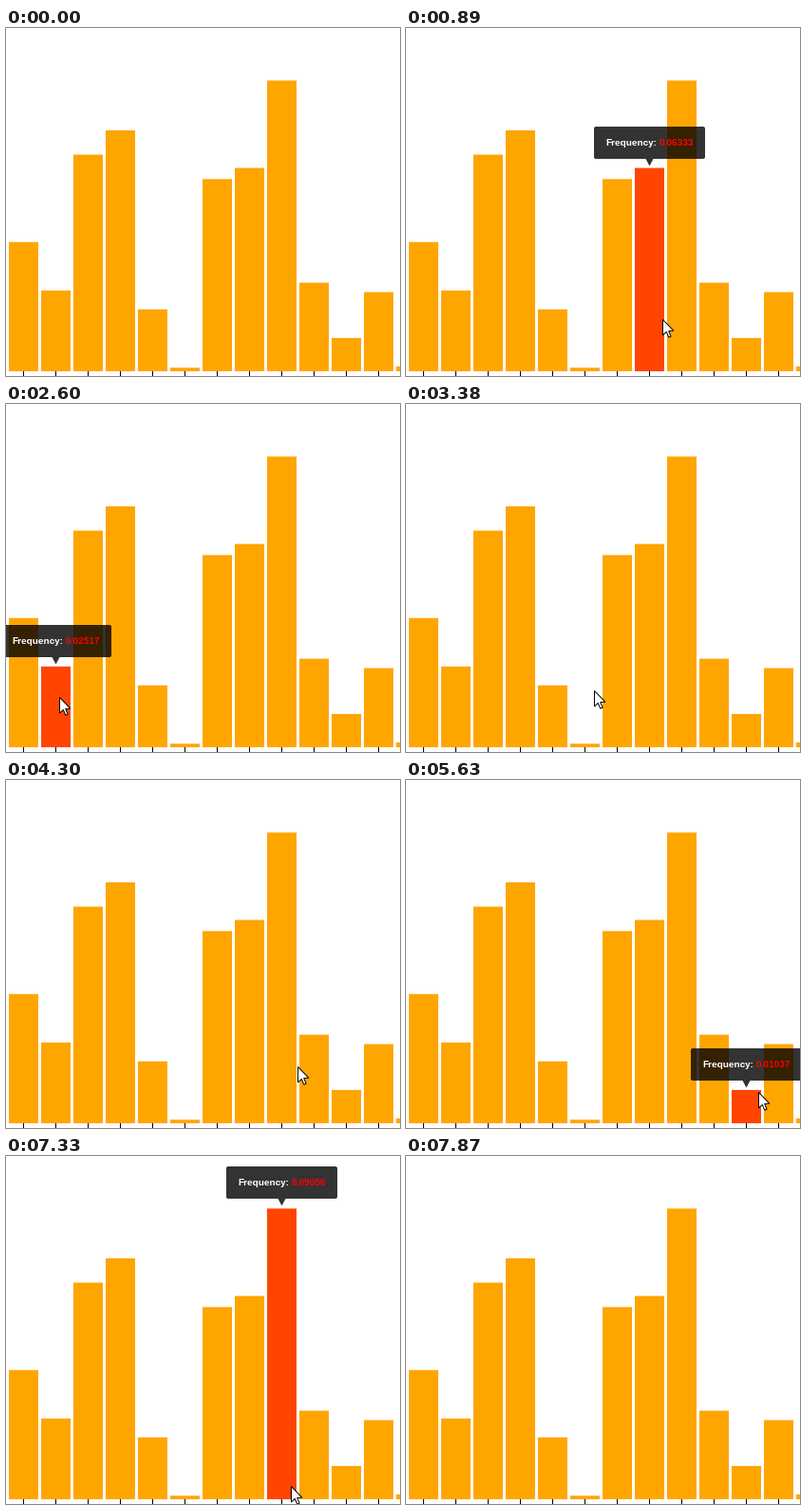
Animation, 415 px wide and 367 px high, one loop 8.48 s. Source, as a matplotlib script:

```python
import matplotlib.pyplot as plt
from matplotlib.animation import FuncAnimation
from matplotlib.patches import FancyBboxPatch, Polygon

plt.rcParams["text.hinting"] = "native"

W, H, DPI = 415, 367, 64
PX = 72 / DPI                      # points per pixel
LOOP, STEP, TICK = 8480, 10, 77    # ms

# English letter frequencies, L to X
FREQ = [.04025, .02517, .06749, .07507, .01929, .00110, .05987,
        .06333, .09056, .02758, .01037, .02465, .00150]
BASE, LEFT, PITCH, BAR_W = 362, 3, 34, 31
SCALE = 430 / .12702
TIP_W, TIP_H, PAD = 117, 34, 12

# pointer legs: start, end, destination
OFF = (318, 400)
LEGS = [
    (200, 430, (316, 324)),
    (740, 890, (270, 307)),
    (1670, 1900, (113, 307)),
    (2450, 2680, (54, 309)),
    (3020, 3380, (198, 302)),
    (3460, 3690, (252, 303)),
    (4070, 4300, (307, 302)),
    (4380, 4530, (347, 328)),
    (4700, 4700, (350, 328)),
    (5630, 5940, (381, 330)),
    (6870, 6870, (382, 330)),
    (6950, 7410, (300, 348)),
    (7720, 7800, (321, 360)),
    (7870, 7870, OFF),
]
ARROW = [(.5, .5), (.5, 17), (4.3, 13.4), (6.8, 19.2),
         (9.1, 18.2), (6.7, 12.5), (11.8, 12.2)]


def bar_left(i):
    return LEFT + PITCH * i


def bar_top(i):
    return BASE - FREQ[i] * SCALE


def ease_out(u):
    return 1 - (1 - u) ** 5


def pointer_at(ms):
    """Eased position, sampled once per tick of the screen recording."""
    x, y = OFF
    for start, end, (tx, ty) in LEGS:
        if ms < start:
            break
        ticks = round((end - start) / TICK)
        done = min(1, (ms - start) / max(1, end - start))
        e = ease_out((1 + int(done * ticks + 1e-6)) / (ticks + 1))
        x, y = round(x + (tx - x) * e), round(y + (ty - y) * e)
        if ms >= end:
            x, y = tx, ty
    return x, y


def hovered(x, y):
    i, dx = divmod(x - LEFT, PITCH)
    if 0 <= i < len(FREQ) and dx < BAR_W and bar_top(i) <= y < BASE:
        return i
    return None


def shifted(points, dx, dy):
    return [(x + dx, y + dy) for x, y in points]


fig = plt.figure(figsize=(W / DPI, H / DPI), dpi=DPI, facecolor="white")
ax = fig.add_axes([0, 0, 1, 1])
ax.axis("off")

lefts = [bar_left(i) for i in range(len(FREQ))]
flat = dict(align="edge", linewidth=0, snap=False)
bars = ax.bar(lefts, [-f * SCALE for f in FREQ], BAR_W, bottom=BASE,
              color="orange", **flat)
ax.bar([x + 15 for x in lefts], 5, 1, bottom=BASE, color="black", **flat)
ax.set_xlim(0, W)
ax.set_ylim(H, 0)

shade = dict(facecolor=(0, 0, 0, .8), linewidth=0, zorder=3)
box = FancyBboxPatch((0, 0), TIP_W, TIP_H,
                     boxstyle="round,pad=0,rounding_size=2", **shade)
tail = Polygon([(0, 0), (1, 0), (0, 1)], **shade)
cursor = Polygon(ARROW, facecolor="white", edgecolor="black",
                 linewidth=PX, joinstyle="miter", zorder=5)
for patch in (box, tail, cursor):
    ax.add_patch(patch)

font = dict(family="Liberation Sans", weight="bold", size=10 * PX,
            va="baseline", zorder=4, clip_on=True)
label = ax.text(0, 0, "Frequency:", color="white", **font)
value = ax.text(0, 0, "", color="red", **font)
tip = (box, tail, label, value)


def show_tip(i):
    mid = bar_left(i) + BAR_W / 2
    x, y = mid - TIP_W / 2, round(bar_top(i) - 44)
    box.set_bounds(x, y, TIP_W, TIP_H)
    tail.set_xy(shifted([(-4, 0), (4, 0), (0, 7.5)], mid, y + TIP_H))
    label.set_position((x + PAD, y + 20))
    value.set_position((x + PAD + 57, y + 20))
    value.set_text(f"{FREQ[i]:.5f}")


def update(n):
    x, y = pointer_at(n * STEP)
    active = hovered(x, y)
    for i, bar in enumerate(bars):
        bar.set_facecolor("orangered" if i == active else "orange")
    for artist in tip:
        artist.set_visible(active is not None)
    if active is not None:
        show_tip(active)
    cursor.set_xy(shifted(ARROW, x, y))
    return (*bars, *tip, cursor)


anim = FuncAnimation(fig, update, frames=LOOP // STEP, interval=STEP,
                     repeat=True, repeat_delay=0, blit=False)
plt.show()
```
